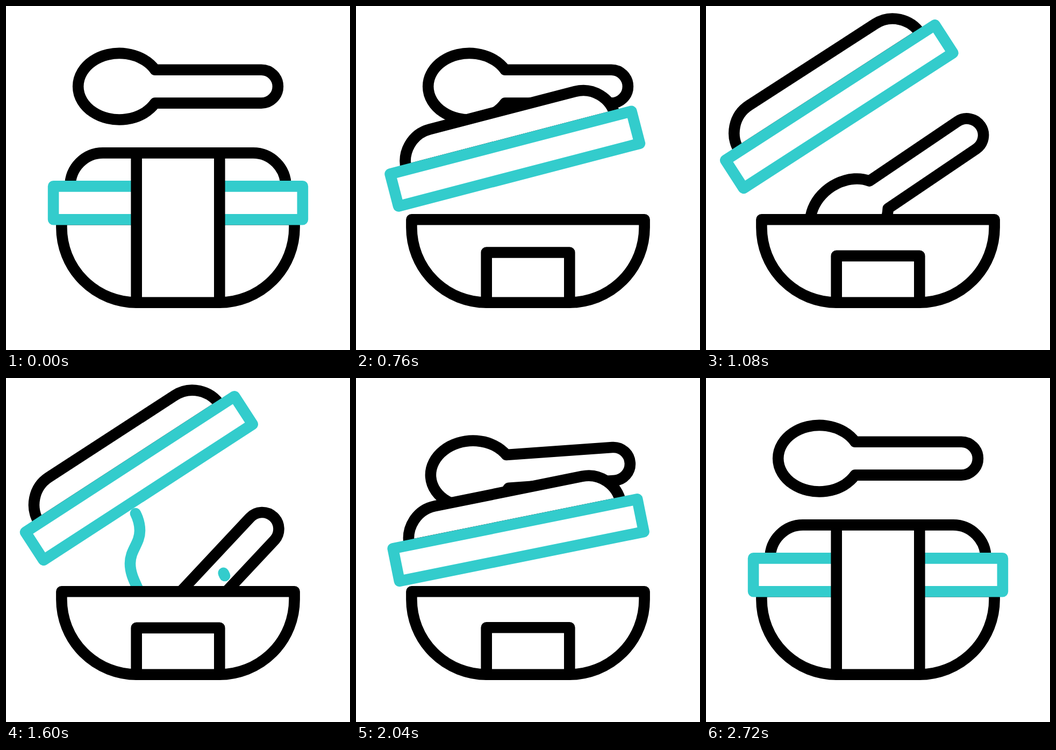
Recreate the animation shown at these times as an HTML page. Size 640 by 640 pixels, loop 3000 ms.

```html
<!DOCTYPE html>
<html lang="en">
<head>
<meta charset="utf-8">
<title>Lunch box</title>
<style>
  html, body { margin: 0; width: 100%; height: 100%; overflow: hidden; background: #fff; }
  svg { display: block; width: 100%; height: 100%; }
  path, rect { fill: #fff; stroke: #000; stroke-width: 20.6; stroke-linecap: round; stroke-linejoin: round; }
  .teal { stroke: #3cc; }
  .steam { fill: none; }
</style>
</head>
<body>
<svg viewBox="0 0 640 640">
  <path id="spoon" d="M277.3 118.8H475A30.9 30.9 0 0 1 475 180.6H277.3A76.7 61.8 0 1 1 277.3 118.8Z"/>
  <path id="steamLeft" class="teal steam" pathLength="100"
    d="M248 398C240 380 231 365 231 345C231 320 249 308 249 284C249 272 246 262 241 252"/>
  <path id="steamRight" class="teal steam" pathLength="100"
    d="M407 368C399 350 390 335 390 315C390 290 408 278 408 254C408 242 405 232 400 222"/>
  <path d="M103.4 397.3H536.6V412A139.7 139.7 0 0 1 396.9 551.7H243.1A139.7 139.7 0 0 1 103.4 412Z"/>
  <g id="lid">
    <path d="M119.3 335.4A61 62 0 0 1 180.3 273.4H459.7A61 62 0 0 1 520.7 335.4Z"/>
    <rect class="teal" x="88.1" y="335.4" width="463.8" height="61.9"/>
  </g>
  <rect id="label" x="242.7" width="154.6"/>
</svg>
<script>
const LOOP = 3000;
const BOTTOM = 551.7;
const part = id => document.getElementById(id);
const [spoon, lid, label, steamLeft, steamRight] =
  ['spoon', 'lid', 'label', 'steamLeft', 'steamRight'].map(part);

// Symmetric cubic-bezier(k, 0, 1 - k, 1), solved by bisection
function ease(u, k = 0.58) {
  if (u <= 0) return 0;
  if (u >= 1) return 1;
  let lo = 0, hi = 1;
  for (let i = 0; i < 24; i++) {
    const s = (lo + hi) / 2;
    const x = s * (3 * k + s * (3 - 9 * k + s * (6 * k - 2)));
    if (x < u) lo = s; else hi = s;
  }
  return lo * lo * (3 - 2 * lo);
}

const ramp = (t, from, to) => ease((t - from) / (to - from));

// Rises from a to b, falls back from c to d
const swing = (t, a, b, c, d) => ramp(t, a, b) - ramp(t, c, d);

function place(el, x, y, dx, dy, angle) {
  el.setAttribute('transform',
    `translate(${dx} ${dy}) rotate(${-angle} ${x} ${y})`);
}

function puff(el, t, a, b, c, d) {
  const end = 100 * ramp(t, a, b), start = 100 * ramp(t, c, d);
  el.style.display = end - start > 0.01 ? '' : 'none';
  el.setAttribute('stroke-dasharray', `0 ${start} ${end - start} 300`);
}

function draw(t) {
  const fold = swing(t, 160, 880, 2000, 2720);
  const top = 273.5 + 191.4 * fold;
  label.setAttribute('y', top);
  label.setAttribute('height', BOTTOM - top);

  const open = swing(t, 433, 1123, 1678, 2318);
  place(lid, 116, 379, -32.8 * open, -70.8 * open, 33 * open);

  const tilt = 48 * swing(t, 843, 1243, 1500, 2220);
  place(spoon, 320, 149.7, 1.08 * tilt, 5.21 * tilt, tilt);

  puff(steamLeft, t, 1440, 1600, 1640, 1840);
  puff(steamRight, t, 1570, 1750, 1770, 1980);
}

function tick() {
  draw(performance.now() % LOOP);
  requestAnimationFrame(tick);
}
tick();
</script>
</body>
</html>
```
